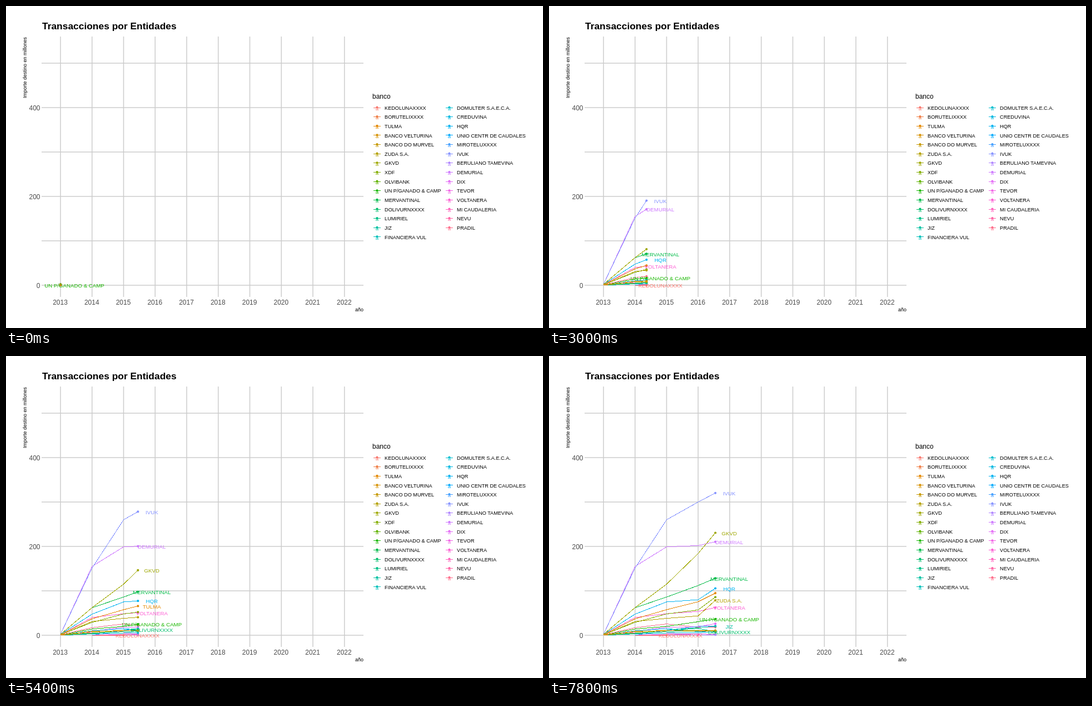
An HTML page for the animation above (8 s loop, 966 by 580 pixels).

```html
<!DOCTYPE html>
<html lang="es">
<head>
<meta charset="utf-8">
<title>Transacciones por Entidades</title>
<style>
  html, body { margin: 0; width: 100%; height: 100%; overflow: hidden; background: #fff; }
  svg { display: block; width: 966px; height: 580px; font-family: "Liberation Sans", Arial, sans-serif; }
  .grid { stroke: #ccc; stroke-width: 1.5; }
  .tick { font-size: 12px; fill: #4d4d4d; }
  .small { font-size: 9.15px; }
  .label { font-size: 9.7px; text-anchor: middle; }
  .trace { fill: none; stroke-width: 1; shape-rendering: crispEdges; }
</style>
</head>
<body>
<svg id="stage" viewBox="0 0 966 580"></svg>
<script>
const STEP_MS = 200, STEPS = 40, STEPS_PER_YEAR = 11;
const LABEL_DX = 25, LABEL_HEIGHT = 9;

// name | first year after 2013 | yearly values, in millions
const series = `
KEDOLUNAXXXX|1|0 0
BORUTELIXXXX
TULMA|0|1 37 57.5 75.5 111
BANCO VELTURINA|0|0 9 10 11 10
BANCO DO MURVEL|0|1 8 11 10 9
ZUDA S.A.|0|1 31 38 43.5 108
GKVD|0|2 62 115 184 269.5
XDF|0|1 29 48 57 110
OLVIBANK|0|1 5 11 9 12
UN P/GANADO & CAMP|0|0 14 20 30.5 41.5
MERVANTINAL|0|2 62 86 112 142
DOLIVURNXXXX|2|10 15.5 1
LUMIRIEL|0|0 4 8 11 9
JIZ|2|12 17 22.5
FINANCIERA VUL
DOMULTER S.A.E.C.A.|0|0 3 5 6 8
CREDUVINA
HQR|0|2 47.5 75 80 127
UNIO CENTR DE CAUDALES|0|0 10 15 8 11
MIROTELUXXXX|1|0 11 20 22
IVUK|0|2 151 260 300 337
BERULIANO TAMEVINA|0|0 3 2 1 1
DEMURIAL|0|2 155 199 202 217.5
DIX|0|0 9 18 19 32
TEVOR|0|0 6 4 3 1
VOLTANERA|0|1 40 48.5 53.5 70
MI CAUDALERIA|1|0 0.5 0.5
NEVU
PRADIL|0|1 17 25.5 18 18`.trim().split("\n").map((row, i) => {
  const [name, first, values] = row.split("|");
  return { name, first: +first, values: values && values.split(" ").map(Number), color: hue(15 + 360 * i / 29) };
});

// Labels claim space in this order; later ones that would overlap are hidden.
const leaders = [9, 10, 20, 17, 25, 5, 0, 11, 13, 22, 6];
const priority = leaders.concat([...series.keys()].filter(i => !leaders.includes(i)));

const xAt = year => 98 + 56.76 * year;
const yAt = value => 503 - 0.8 * value;

// Polar LUV colour with luminance 65 and chroma 100.
function hue(degrees) {
  const L = 65, C = 100, h = degrees * Math.PI / 180;
  const u = C * Math.cos(h) / (13 * L) + 0.1978, v = C * Math.sin(h) / (13 * L) + 0.4683;
  const Y = ((L + 16) / 116) ** 3, X = 9 * Y * u / (4 * v), Z = 3 * Y / v - X / 3 - 5 * Y;
  const rgb = [
    3.2405 * X - 1.5371 * Y - 0.4985 * Z,
    -0.9693 * X + 1.876 * Y + 0.0416 * Z,
    0.0556 * X - 0.204 * Y + 1.0572 * Z
  ].map(c => {
    const lin = Math.min(1, Math.max(0, c));
    return Math.round(255 * (lin <= 0.0031 ? 12.92 * lin : 1.055 * lin ** (1 / 2.4) - 0.055));
  });
  return `rgb(${rgb})`;
}

const stage = document.getElementById("stage");

function add(tag, attrs, text, parent = stage) {
  const node = document.createElementNS(stage.namespaceURI, tag);
  for (const key in attrs) node.setAttribute(key, attrs[key]);
  if (text !== undefined) node.textContent = text;
  return parent.appendChild(node);
}

function drawAxes() {
  for (let v = 0; v <= 500; v += 100) {
    add("line", { class: "grid", x1: 64, x2: 643, y1: yAt(v), y2: yAt(v) });
    if (v % 200 === 0) add("text", { class: "tick", x: 61.5, y: yAt(v) + 5, "text-anchor": "end" }, v);
  }
  for (let k = 0; k < 10; k++) {
    add("line", { class: "grid", x1: xAt(k), x2: xAt(k), y1: 55, y2: 524 });
    add("text", { class: "tick", x: xAt(k) - 0.5, y: 538, "text-anchor": "middle" }, 2013 + k);
  }
  add("text", { x: 65, y: 42, "font-size": 17.4, "font-weight": 700 }, "Transacciones por Entidades");
  add("text", { transform: "translate(37 56) rotate(-90)", "font-size": 9, "text-anchor": "end" }, "Importe destino en millones");
  add("text", { x: 643, y: 550, "font-size": 9, "text-anchor": "end" }, "año");
}

function drawLegend() {
  add("text", { x: 659, y: 167, "font-size": 12 }, "banco");
  series.forEach(({ name, color }, i) => {
    const x = i < 15 ? 667.5 : 797.5, y = 183 + 16.64 * (i % 15);
    add("line", { class: "trace", x1: x - 6.5, x2: x + 6.5, y1: y, y2: y, stroke: color });
    add("circle", { cx: x, cy: y - 0.5, r: 2.1, fill: color });
    add("text", { class: "label", x, y: y + 4.8, fill: color }, "a");
    add("text", { class: "small", x: x + 13.6, y: y + 3.6 }, name);
  });
}

drawAxes();
drawLegend();

const [traces, dots, labels] = [0, 1, 2].map(() => add("g", {}));
for (const s of [...series].reverse()) {
  if (!s.values) continue;
  s.trace = add("polyline", { class: "trace", stroke: s.color }, undefined, traces);
  s.dot = add("circle", { r: 2.1, fill: s.color }, undefined, dots);
  s.label = add("text", { class: "label", fill: s.color }, s.name, labels);
  s.width = s.label.getComputedTextLength();
}

function place(s, year) {
  const last = s.values.length - 1;
  const pos = Math.min(year - s.first, last);
  s.shown = pos >= -1e-9;
  for (const node of [s.trace, s.dot]) node.style.display = s.shown ? "" : "none";
  if (!s.shown) return;

  const k = Math.max(0, Math.min(Math.floor(pos + 1e-9), last));
  const from = s.values[k], to = s.values[Math.min(k + 1, last)];
  s.x = xAt(s.first + pos);
  s.y = yAt(from + (to - from) * (pos - k));
  const points = s.values.slice(0, k + 1).map((v, i) => [xAt(s.first + i), yAt(v)]);
  s.trace.setAttribute("points", [...points, [s.x, s.y]].join(" "));
  s.dot.setAttribute("cx", s.x);
  s.dot.setAttribute("cy", s.y);
  s.label.setAttribute("x", s.x + LABEL_DX);
  s.label.setAttribute("y", s.y + 4.2);
}

function render(step) {
  const placed = [];
  for (const i of priority) {
    const s = series[i];
    if (!s.values) continue;
    place(s, step / STEPS_PER_YEAR);
    const free = s.shown && placed.every(p =>
      Math.abs(p.y - s.y) >= LABEL_HEIGHT || Math.abs(p.x - s.x) >= (p.width + s.width) / 2);
    s.label.style.display = free ? "" : "none";
    if (free) placed.push(s);
  }
}

const start = performance.now();
let current = -1;
function tick() {
  const step = Math.floor((performance.now() - start) / STEP_MS) % STEPS;
  if (step !== current) render(current = step);
  requestAnimationFrame(tick);
}
tick();
</script>
</body>
</html>
```
